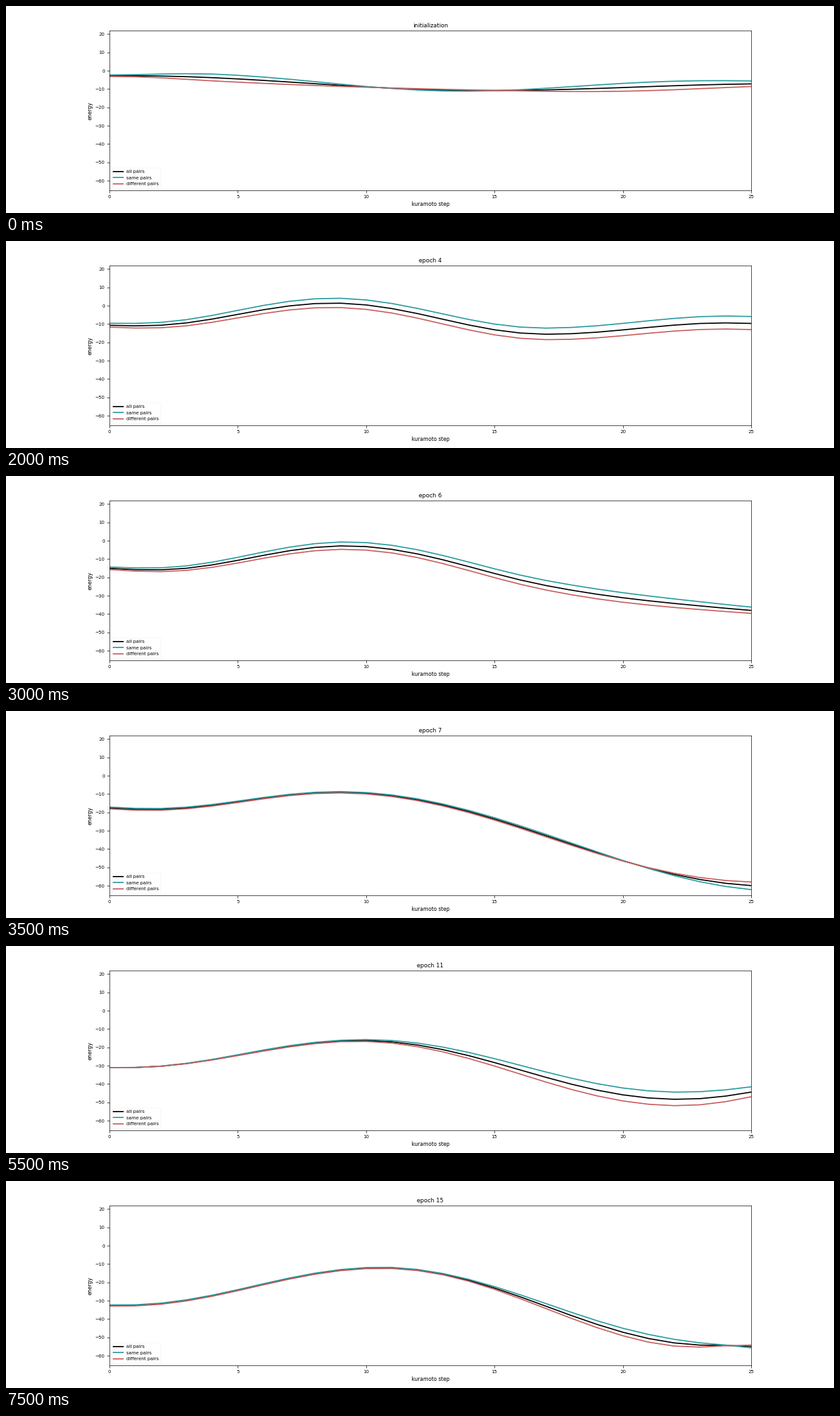
A matplotlib script for the animation above (8 s loop, 1280 px wide and 320 px high).

```python
import numpy as np
import matplotlib.pyplot as plt
from matplotlib.animation import FuncAnimation

plt.rcParams.update({
    "font.family": "DejaVu Sans",
    "axes.titlesize": 10, "axes.labelsize": 9,
    "xtick.labelsize": 8, "ytick.labelsize": 8, "legend.fontsize": 8,
    "xtick.major.size": 4.8, "ytick.major.size": 4.8,
    "patch.linewidth": 0.8,
})

EPOCHS = 16
STEPS = np.arange(26)

# epoch: turning points (step, value) of the mean energy and of same - different
TURNS = {
    0: ([(1, -2.7), (14.5, -10.8), (26, -7)],
        [(0, .8), (4.5, 3.8), (13, -.9), (21.5, 4.7), (29, 1)]),
    2: ([(0, -6.9), (6.2, .9), (16.3, -19.3), (26.3, -2.9)],
        [(0, 2.7), (9, .6), (15, 1.1), (23, -.6)]),
    5: ([(-3, -10.5), (1.8, -13.3), (9.5, 3.9), (17.1, -11.6), (22.8, -8.1), (29, -14)],
        [(-4, .5), (10, 7.4), (25, 11)]),
    7: ([(-4, -14), (1.6, -18.4), (8.9, -9), (26, -60.5)],
        [(0, 1), (8, .7), (17, 1.4), (29, -6)]),
    9: ([(.9, -28.6), (9.8, -12.8), (11.5, -12.9), (24.8, -38.7)],
        [(8, .4), (25, 11)]),
    11: ([(.7, -31), (9.8, -16.2), (22.2, -48.1), (30, -34.5)],
         [(0, 0), (8, .7), (22, 7.4), (30, 1)]),
    15: ([(.6, -32.6), (10.6, -12), (23.5, -54.3), (27, -56)],
         [(12, .6), (21, 4.2), (27, -3.4)]),
}


def swing(points):
    """Ease along a cosine from each turning point to the next."""
    xs, ys = np.array(points, float).T
    i = np.clip(np.searchsorted(xs, STEPS, side="right") - 1, 0, len(xs) - 2)
    t = np.clip((STEPS - xs[i]) / (xs[i + 1] - xs[i]), 0, 1)
    return ys[i] + (ys[i + 1] - ys[i]) * (1 - np.cos(np.pi * t)) / 2


def curves(epoch):
    a = max(k for k in TURNS if k <= epoch)
    b = min(k for k in TURNS if k >= epoch)
    w = (epoch - a) / max(b - a, 1)
    start, end = (np.array([swing(p) for p in TURNS[k]]) for k in (a, b))
    mean, gap = (1 - w) * start + w * end
    # late steps sag between the key epochs, more so as training goes on
    late = swing([(8, 0), (22, 1)])
    mean = mean - 8 * epoch / EPOCHS * np.sin(np.pi * w) * late
    return mean - .03 * gap, mean + gap / 2, mean - gap / 2


fig, ax = plt.subplots(figsize=(20, 5), dpi=64)
fig.subplots_adjust(left=.125, right=.9, bottom=.11, top=.88)
styles = {"all pairs": "black", "same pairs": "#2a9b9f", "different pairs": "#c95f5f"}
lines = [ax.plot([], [], color=c, lw=2, label=name)[0] for name, c in styles.items()]
ax.set(xlim=(0, 25), ylim=(-65.2, 21.8),
       xticks=range(0, 26, 5), yticks=range(-60, 21, 10))
ax.set_xlabel("kuramoto step")
ax.set_ylabel("energy", labelpad=3)
ax.legend(loc="lower left", edgecolor="0.95")
title = ax.set_title("")


def update(epoch):
    for line, y in zip(lines, curves(epoch)):
        line.set_data(STEPS, y)
    title.set_text(f"epoch {epoch}" if epoch else "initialization")
    return [*lines, title]


anim = FuncAnimation(fig, update, frames=EPOCHS, interval=500,
                     init_func=lambda: update(0), repeat=True, repeat_delay=0)
plt.show()
```
